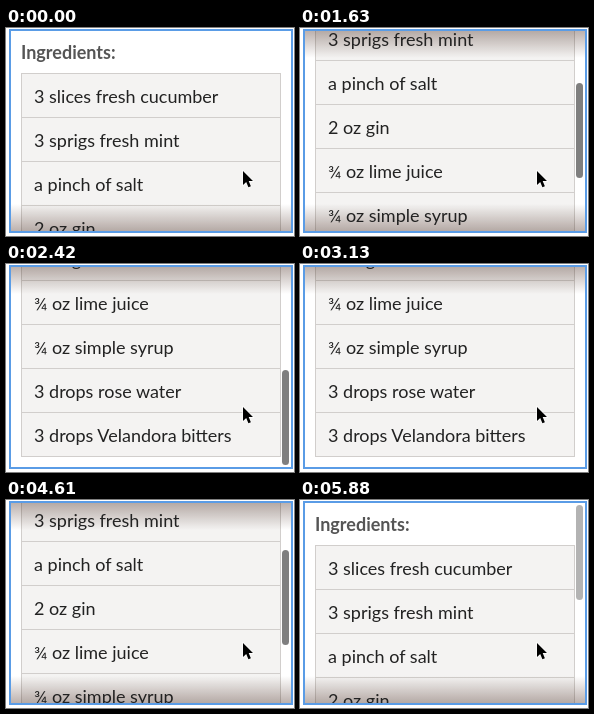
Write an HTML page that moves like this. It is 288x208 px and loops after 5910 ms.

```html
<!DOCTYPE html>
<html lang="en">
<head>
<meta charset="utf-8">
<title>Scrolling ingredients</title>
<style>
html, body { margin: 0; width: 100%; height: 100%; overflow: hidden; background: #fff; }
body { position: relative; font: 18px/43px Lato, sans-serif; color: #222; }
#box {
  --shade: rgba(70, 40, 30, .36), rgba(70, 40, 30, 0);
  position: absolute; left: 3px; top: 1px; width: 280px; height: 200px;
  border: 2px solid #5a9ce6; overflow: hidden;
  background:
    linear-gradient(var(--shade)) top / 100% 27px no-repeat,
    linear-gradient(to top, var(--shade)) bottom / 100% 27px no-repeat;
}
/* White ends travel with the content and hide the shadows at either limit. */
#content {
  --cover: #fff 30px, rgba(255, 255, 255, 0) 75px;
  position: relative; height: 405px;
  background: linear-gradient(var(--cover)), linear-gradient(to top, var(--cover));
}
h1 { position: absolute; left: 10px; top: 0; margin: 0; font-size: 18px; color: #555; }
ul {
  position: absolute; left: 10px; top: 42px; width: 258px; margin: 0; padding: 0;
  list-style: none; border: solid rgba(50, 40, 30, .18); border-width: 0 1px 1px;
  background: rgba(60, 50, 20, .055);
}
li { height: 43px; padding-left: 12px; border-top: 1px solid rgba(50, 40, 30, .18); line-height: 45px; white-space: nowrap; }
#thumb { position: absolute; left: 271px; top: 2px; width: 7px; height: 95px; border-radius: 4px; background: rgba(0, 0, 0, .5); }
svg { position: absolute; left: 234px; top: 140px; }
</style>
</head>
<body>
<div id="box">
  <div id="content">
    <h1>Ingredients:</h1>
    <ul>
      <li>3 slices fresh cucumber</li>
      <li>3 sprigs fresh mint</li>
      <li>a pinch of salt</li>
      <li>2 oz gin</li>
      <li>¾ oz lime juice</li>
      <li>¾ oz simple syrup</li>
      <li>3 drops rose water</li>
      <li>3 drops Velandora bitters</li>
    </ul>
  </div>
  <div id="thumb"></div>
</div>
<svg width="16" height="24">
  <path d="M3 3V17L6.2 14L8.4 19.2L10.9 18.2L8.7 13.1H13Z" fill="#000" stroke="#fff" stroke-width="1.2" paint-order="stroke"/>
</svg>
<script>
const LOOP = 5910, RANGE = 205, TRAVEL = 101;
const content = document.getElementById('content');
const thumb = document.getElementById('thumb');

// [time, scroll offset]
const keys = [[795, 0], [1130, 38], [1630, 101], [2420, RANGE], [3775, RANGE], [5290, 0], [LOOP, 0]];

function scrollAt(t) {
  if (t <= keys[0][0]) return 0;
  const i = keys.findIndex(key => t < key[0]);
  const [t0, y0] = keys[i - 1], [t1, y1] = keys[i];
  return y0 + (y1 - y0) * (t - t0) / (t1 - t0);
}

function thumbOpacity(t) {
  const shown = (t >= 810 && t < 3130) || t >= 3780;
  const fadeStart = t < 3130 ? 2980 : 5820;
  return shown ? Math.min(1, Math.max(0, 1 - (t - fadeStart) / 150)) : 0;
}

function draw(now) {
  const t = now % LOOP, y = scrollAt(t);
  content.style.transform = `translateY(${-Math.round(y)}px)`;
  thumb.style.transform = `translateY(${Math.round(y / RANGE * TRAVEL)}px)`;
  thumb.style.opacity = thumbOpacity(t);
  requestAnimationFrame(draw);
}
draw(performance.now());
</script>
</body>
</html>
```
